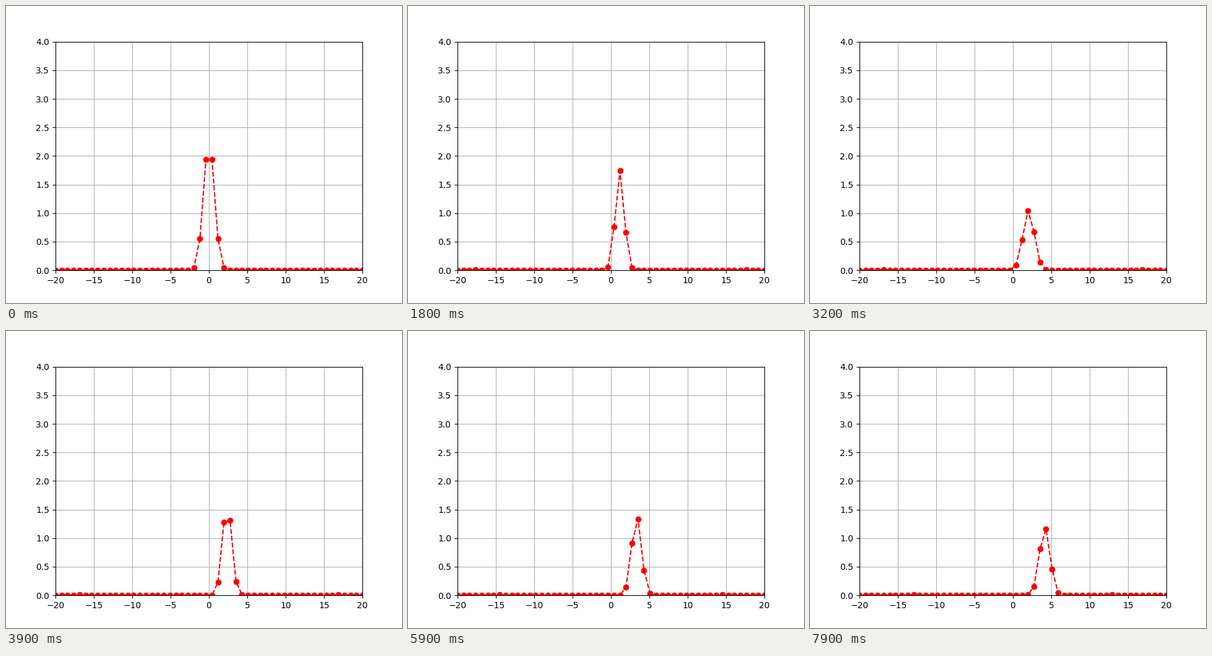
Recreate the animation shown at these times as a matplotlib script. Size 640 by 480 pixels, loop 8 s.

```python
import numpy as np
import matplotlib.pyplot as plt
from matplotlib.animation import FuncAnimation

FRAMES, STEP = 80, 100
PERIOD = 2.14  # seconds per breath of the pulse
x = np.linspace(-20, 20, 52)


def pulse(t):
    """Slowing Gaussian pulse that breathes and gets narrower as it rises."""
    phase = 2 * np.pi * t / PERIOD
    peak = 1.5 - 0.02 * t + 0.4 * np.cos(phase) + 0.37 * np.exp(-t)
    centre = 0.71 * t - 0.0225 * t ** 2 + 0.07 * np.sin(phase)
    sharpness = 0.87 * peak - 0.95 * np.exp(-t / 0.6)
    return peak * np.exp(-sharpness * (x - centre) ** 2)


def ripple(t):
    """Faint pair of bumps that drifts in from both ends."""
    r = max(12.94, 18.25 - 0.11 * t ** 2)
    near = np.abs(np.abs(x) - r) < (x[1] - x[0]) / 2
    return np.where(near & (t > 0), 0.01, 0)


def height(t):
    return np.maximum(pulse(t), ripple(t))


fig, ax = plt.subplots(figsize=(6.4, 4.8), dpi=100)
ax.set_xlim(-20, 20)
ax.set_ylim(0, 4)
ax.grid(True)
line, = ax.plot(x, height(0), "ro--")


def update(n):
    line.set_ydata(height(n * STEP / 1000))
    return line,


anim = FuncAnimation(fig, update, frames=FRAMES, interval=STEP,
                     repeat=True, repeat_delay=0)
plt.show()
```
